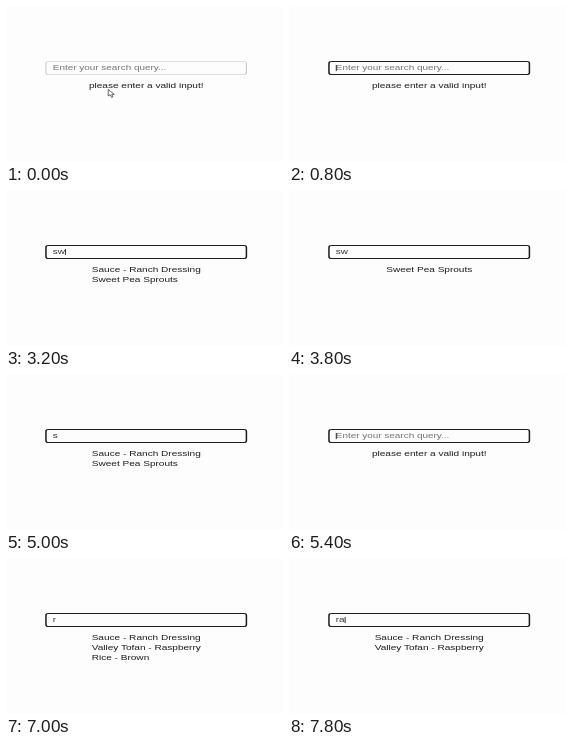
Write an HTML page that moves like this. It is 277 px wide and 156 px high and loops after 8000 ms.

```html
<!DOCTYPE html>
<html lang="en">
<head>
<meta charset="utf-8">
<title>Search box</title>
<style>
  html, body { margin: 0; width: 100%; height: 100%; overflow: hidden; background: #fefdfe; }
  svg { display: block; width: 100%; height: 100%; }
  text { font: 7px "Liberation Sans", Arial, sans-serif; fill: #1c1c1c; white-space: pre; }
  #hint, #query { font-size: 6.9px; }
  #hint { fill: #747474; }
  #query { fill: #333; }
</style>
</head>
<body>
<!-- the picture is squeezed vertically, so the view is stretched 1.44 times in width -->
<svg viewBox="0 0 192.36 156" preserveAspectRatio="none">
  <rect width="193" height="156" fill="#fefdfe"/>
  <rect id="box" x="27.75" y="55.5" width="139.2" height="13" rx="1.8" fill="#fefdfe"/>
  <text id="hint" x="32.5" y="64.1">Enter your search query...</text>
  <text id="query" x="32.5" y="64.1"></text>
  <rect id="caret" y="58.9" width="0.65" height="6.2" fill="#222"/>
  <g id="list"><text y="81.9"></text><text y="91.8"></text><text y="101.7"></text></g>
  <path id="pointer" d="M0 0V6.6L1.3 5.3 2.3 8 3.2 7.5 2.4 5H4.2Z" fill="#fff" stroke="#333" stroke-width=".6"/>
</svg>
<script>
const LOOP = 8000;
const LEFT = 32.5;
const CENTER = 97.4;
const $ = id => document.getElementById(id);
const lines = [...$('list').children];

const invalid = ['please enter a valid input!'];
const sauce = 'Sauce - Ranch Dressing';
const sprouts = 'Sweet Pea Sprouts';
const berry = 'Valley Tofan - Raspberry';

// [time, value]; each value holds until the next one
const typed = [[0, ''], [2100, 's'], [3200, 'sw'], [4300, 's'], [5200, ''], [6400, 'r'], [7700, 'ra']];
const results = [
  [0, invalid], [2200, [sauce, sprouts]], [3300, [sprouts]], [5000, [sauce, sprouts]],
  [5200, invalid], [6500, [sauce, berry, 'Rice - Brown']], [7800, [sauce, berry]]
];
const blink = [
  [0, 0], [800, 1], [1400, 0], [1900, 1], [2700, 0], [3200, 1], [3800, 0], [4300, 1],
  [4900, 0], [5400, 1], [5900, 0], [6400, 1], [7000, 0], [7500, 1]
];
const pointerY = [[0, 83.4], [200, 75], [300, 68.6]];

const at = (track, t) => track.findLast(step => step[0] <= t)[1];
const show = (el, on) => el.setAttribute('visibility', on ? 'visible' : 'hidden');
const widthOf = el => el.textContent ? el.getComputedTextLength() : 0;

function draw(t) {
  const focused = t >= 800;
  $('box').setAttribute('stroke', focused ? '#1c1c1c' : '#c4c4c4');
  $('box').setAttribute('stroke-width', focused ? 1.05 : 0.7);

  const text = at(typed, t);
  $('query').textContent = text;
  show($('hint'), !text);

  // the caret jumps home before the field empties
  const home = t >= 4400 && t < 5200;
  $('caret').setAttribute('x', LEFT + (home ? 0 : widthOf($('query'))));
  show($('caret'), at(blink, t));

  const rows = at(results, t);
  lines.forEach((el, i) => el.textContent = rows[i] || '');
  const x = CENTER - Math.max(...lines.map(widthOf)) / 2;
  lines.forEach(el => el.setAttribute('x', x));

  $('pointer').setAttribute('transform', `translate(71 ${at(pointerY, t)})`);
  show($('pointer'), !focused);
}

const start = performance.now();
function tick() {
  draw((performance.now() - start) % LOOP);
  requestAnimationFrame(tick);
}
tick();
</script>
</body>
</html>
```
